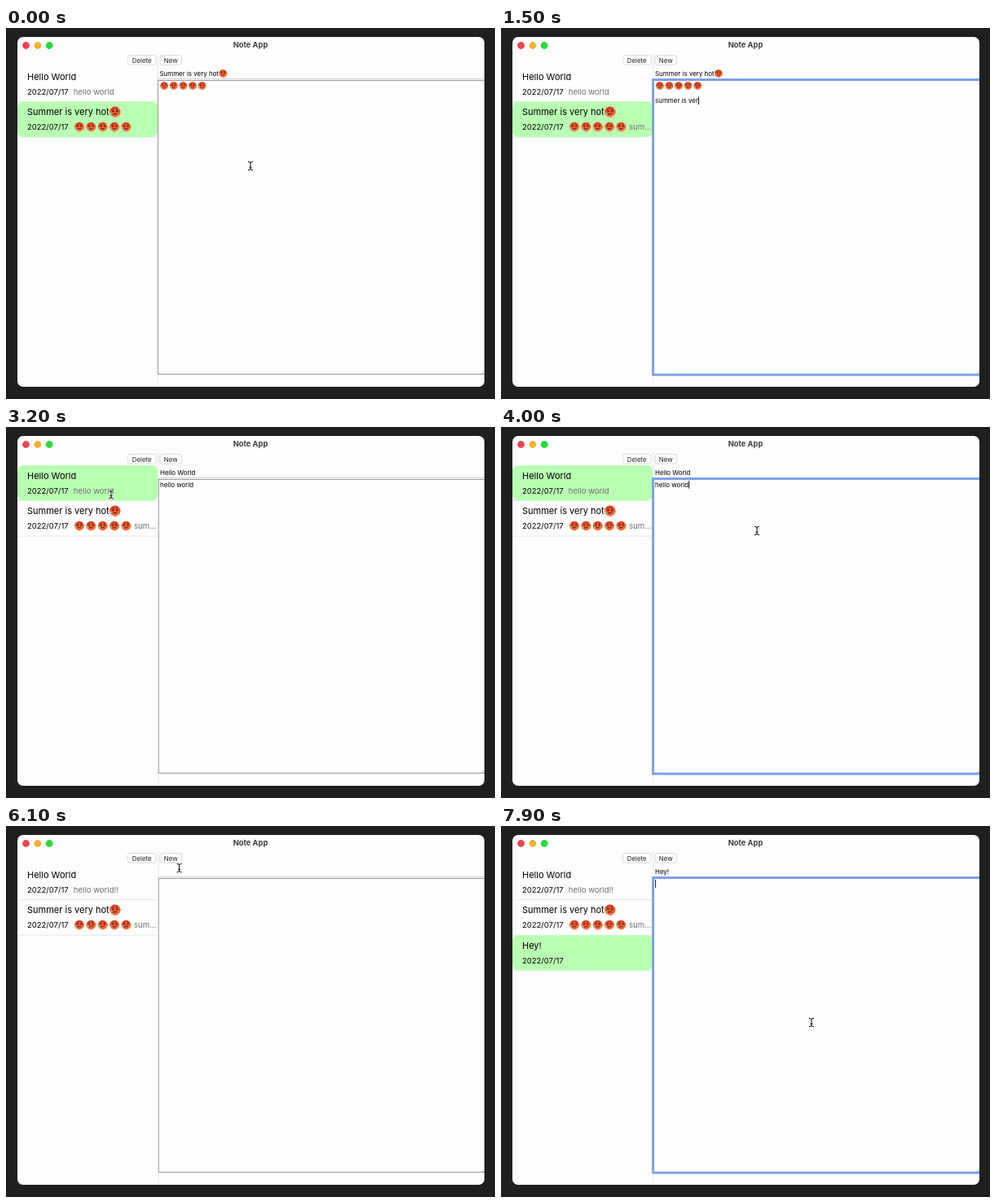
Animation, 600 px wide and 456 px high, one loop 8 s. Source, as an HTML page:

```html
<!DOCTYPE html>
<html lang="en">
<head>
<meta charset="utf-8">
<title>Note App</title>
<style>
  html, body { margin: 0; width: 100%; height: 100%; overflow: hidden; background: #1f1f1f; }
  svg { display: block; width: 100vw; height: 100vh; }
  text { font-family: Inter, "Liberation Sans", sans-serif; white-space: pre; fill: #000; }
  .name { font-size: 11px; }
  .date { font-size: 9.5px; }
  .preview { font-size: 9.6px; fill: #6e6e6e; }
  .field, .button { font-size: 7.95px; }
  .button { fill: #222; text-anchor: middle; }
  .bar { font-size: 9.3px; font-weight: 700; fill: #3d3d3d; text-anchor: middle; }
  .ring { fill: none; stroke: #7c9fe6; }
</style>
</head>
<body>
<svg viewBox="0 0 600 456">
  <defs>
    <linearGradient id="heat" x2="0" y2="1">
      <stop offset="0" stop-color="#d93a20"/>
      <stop offset=".5" stop-color="#ee5a2b"/>
      <stop offset="1" stop-color="#fba93a"/>
    </linearGradient>
    <symbol id="hot" viewBox="0 0 20 20">
      <circle cx="10" cy="10" r="9.3" fill="url(#heat)"/>
      <path d="M4.5 6.2l3-1.2M15.5 6.2l-3-1.2" stroke="#6b2012" stroke-width="1.2"/>
      <ellipse cx="6.7" cy="8.8" rx="1.4" ry="1.7" fill="#5a1c12"/>
      <ellipse cx="13.3" cy="8.8" rx="1.4" ry="1.7" fill="#5a1c12"/>
      <path d="M6 13q4-2 8 0l-.8 2.4H6.8z" fill="#66200f"/>
      <path d="M8 13.6h4.6v3.6q-2.3 2.6-4.6 0z" fill="#ef5074"/>
      <path d="M3 10q-2.6 4 0 5 2.6-1 0-5M16.8 2.8q-2 3.2 0 4 2-.8 0-4" fill="#79c4e6"/>
    </symbol>
    <clipPath id="frame"><rect x="14" y="11" width="573" height="430" rx="7"/></clipPath>
    <clipPath id="side"><rect x="14" y="44" width="172.5" height="397"/></clipPath>
  </defs>

  <rect width="600" height="456" fill="#1f1f1f"/>
  <g clip-path="url(#frame)">
    <rect x="14" y="11" width="573" height="430" fill="#fdfdfd"/>
    <circle cx="24.5" cy="21.5" r="4.4" fill="#ee4456"/>
    <circle cx="38.9" cy="21.5" r="4.4" fill="#f6b032"/>
    <circle cx="53.2" cy="21.5" r="4.4" fill="#2cd93e"/>
    <text class="bar" x="300" y="24.4">Note App</text>
    <g fill="#fff" stroke="#cfcfcf" stroke-width=".8">
      <rect x="149.5" y="33.6" width="34.6" height="11.6" rx="2.6"/>
      <rect x="189" y="33.6" width="26.6" height="11.6" rx="2.6"/>
    </g>
    <text class="button" x="166.7" y="42.5">Delete</text>
    <text class="button" x="202.2" y="42.5">New</text>
    <g id="list" clip-path="url(#side)"></g>

    <g id="pane">
      <path d="M0 31V441" stroke="#e2e2e2" stroke-width=".8"/>
      <path d="M0 62.6H410" stroke="#c9c9c9" stroke-width=".9"/>
      <rect x=".2" y="64.5" width="420" height="361" fill="#fdfdfd" stroke="#858585" stroke-width=".8"/>
      <path d="M396.5 425l3.5-3.5M398.5 425l1.5-1.5" stroke="#888" stroke-width=".6"/>
      <rect id="bodyRing" class="ring" x="-.4" y="63.6" width="420" height="362.6" stroke-width="2.9"/>
      <rect id="titleRing" class="ring" x="-.4" y="48.3" width="420" height="14.6" stroke-width="2.4"/>
      <text id="title" class="field" x="2" y="58.9"></text>
      <use id="titleHot" href="#hot" x="74.6" y="50.8" width="10.6" height="10.6"/>
      <text id="body" class="field" x="2" y="74"></text>
      <g id="bodyHot"></g>
      <path id="caret" stroke="#000" stroke-width=".9"/>
    </g>
  </g>

  <g id="pointer">
    <g id="beam" fill="none" stroke-linecap="round">
      <path d="M-2.6-5.2Q0-5.2 0-3.4Q0-5.2 2.6-5.2M0-3.6V3.6M-2.6 5.2Q0 5.2 0 3.4Q0 5.2 2.6 5.2M-1.2 1.6H1.2" stroke="#fff" stroke-width="2"/>
      <path d="M-2.6-5.2Q0-5.2 0-3.4Q0-5.2 2.6-5.2M0-3.6V3.6M-2.6 5.2Q0 5.2 0 3.4Q0 5.2 2.6 5.2M-1.2 1.6H1.2" stroke="#111" stroke-width="1"/>
    </g>
    <path id="arrow" d="M0 0V9.6L2.2 7.6 3.7 11 5.3 10.3 3.8 7H6.8Z" fill="#000" stroke="#fff" stroke-width=".7"/>
  </g>
</svg>

<script>
const LOOP = 8000, ROW = 43.6;
const $ = id => document.getElementById(id);

function add(parent, tag, attrs, text = '') {
  const el = document.createElementNS('http://www.w3.org/2000/svg', tag);
  for (const k in attrs) el.setAttribute(k, attrs[k]);
  el.textContent = text;
  return parent.appendChild(el);
}

function hotFaces(parent, n, x, y, size, step) {
  for (let i = 0; i < n; i++)
    add(parent, 'use', { href: '#hot', x: x + i * step, y, width: size, height: size });
}

const show = (el, on) => { el.style.display = on ? '' : 'none'; };
const put = (el, s) => { if (el.textContent !== s) el.textContent = s; };

const rows = ['Hello World', 'Summer is very hot', 'Hey!'].map((name, i) => {
  const g = add($('list'), 'g', { transform: `translate(0 ${47 + i * ROW})` });
  add(g, 'path', { d: `M14 ${ROW}H187`, stroke: '#e6e6f0', 'stroke-width': .9 });
  const mark = add(g, 'rect', { x: 14, y: 0, width: 172.3, height: ROW - .2, rx: 7, fill: '#b9ffb3' });
  add(g, 'text', { class: 'name', x: 26, y: 16.8 }, name);
  add(g, 'text', { class: 'date', x: 26, y: 34.6 }, '2022/07/17');
  const preview = add(g, 'text', { class: 'preview', x: i === 1 ? 157 : 82.8, y: 34.6 });
  if (i === 1) {
    hotFaces(g, 1, 126.6, 5.5, 14.4, 0);
    hotFaces(g, 5, 83.6, 24.6, 12.8, 14.35);
  }
  return { g, mark, preview };
});
hotFaces($('bodyHot'), 5, 2.5, 65.8, 10.6, 11.6);

// time, x, y of the pointer
const path = [
  [0, 300, 169.5], [2650, 300, 169.5], [3050, 129, 83], [3550, 129, 83],
  [3900, 314, 127.5], [5000, 314, 127.5], [5480, 203, 46], [5600, 203, 42],
  [5850, 203, 42], [6250, 217, 56], [7350, 217, 56], [7750, 381, 241.5], [8000, 381, 241.5]
];
// spans in which typing hides the pointer
const hidden = [[900, 2650], [4400, 5000], [6800, 7350]];

function pointerAt(t) {
  const i = path.findIndex(p => p[0] > t);
  const [t0, x0, y0] = path[i - 1], [t1, x1, y1] = path[i];
  const u = (t - t0) / (t1 - t0), e = u * u * (3 - 2 * u);
  return [x0 + (x1 - x0) * e, y0 + (y1 - y0) * e];
}

// text typed at a steady pace
function typed(s, t, start, pace) {
  const n = Math.floor((t - start) / pace) + 1;
  return s.slice(0, Math.max(0, n));
}

// moments that restart the caret's blink
const actions = [400, 900, 1050, 1500, 1800, 3900, 4400, 4700, 6350, 6800, 7100, 7300, 7800];

function draw(t) {
  const summer = typed('summer is very hot', t, 1050, 37);
  const hello = 'hello world' + typed('!!', t, 4400, 300);
  const hey = t < 6800 ? '' : 'H' + typed('ey!', t, 7100, 90);
  const note = t < 3100 ? 1 : t < 5650 ? 0 : 2;
  const inBody = (t >= 400 && t < 3100) || (t >= 3900 && t < 5650) || t >= 7800;
  const inTitle = t >= 6350 && t < 7800;
  const saved = t >= 7300;
  const left = t < 1050 ? 186.4 : 187;

  rows.forEach((r, i) => show(r.mark, i === note));
  show(rows[2].g, saved);
  put(rows[0].preview, hello);
  put(rows[1].preview, summer.length > 3 ? 'sum...' : summer);

  $('pane').setAttribute('transform', `translate(${left} 0)`);
  show($('bodyRing'), inBody);
  show($('titleRing'), inTitle);
  put($('title'), ['Hello World', 'Summer is very hot', hey][note]);
  put($('body'), [hello, summer, ''][note]);
  $('body').setAttribute('y', note === 1 ? 92.4 : 74);
  show($('titleHot'), note === 1);
  show($('bodyHot'), note === 1);

  const last = actions.filter(a => a <= t).pop() || 0;
  const lit = (t - last) % 1000 < 500;
  show($('caret'), lit && (inBody || inTitle));
  const field = $(inTitle ? 'title' : 'body');
  let x = 2.6 + field.getComputedTextLength(), y = inTitle ? 51 : 66;
  if (inBody && note === 1) {
    if (t < 900) x = 60.6;
    else y = t < 980 ? 75.2 : 84.4;
  }
  $('caret').setAttribute('d', `M${x} ${y}v9.8`);

  const [px, py] = pointerAt(t);
  const overText = py > 48 && (px > 187 || px < 134);
  $('pointer').setAttribute('transform', `translate(${px} ${py})`);
  show($('pointer'), !hidden.some(([a, b]) => t >= a && t < b));
  show($('beam'), overText);
  show($('arrow'), !overText);
}

const begin = performance.now();
function tick() {
  draw((performance.now() - begin) % LOOP);
  requestAnimationFrame(tick);
}
tick();
</script>
</body>
</html>
```
